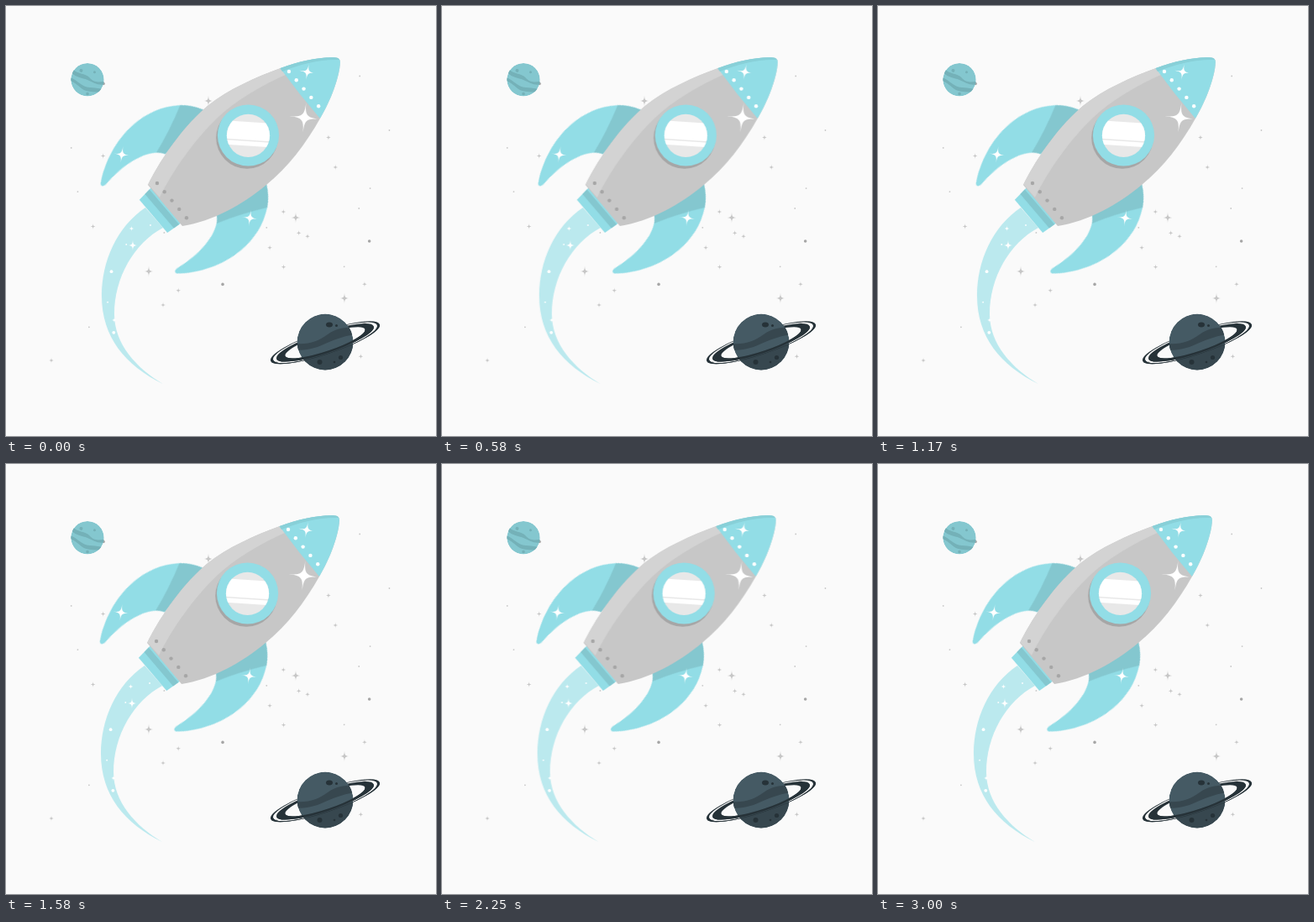
An HTML page for the animation above (3.04 s loop, 512 by 512 pixels).

```html
<!DOCTYPE html>
<html lang="en">
<head>
<meta charset="utf-8">
<title>Rocket</title>
<style>
  html, body { margin: 0; width: 100%; height: 100%; overflow: hidden; background: #fafafa; }
  svg { display: block; width: 100vw; height: 100vh; }
  .cyan { fill: #92dde6; }
  .shade { fill: #84c7cf; }
  .grey { fill: #c7c7c7; }
  .rivet { fill: #a6a6a6; }
  .white { fill: #fff; }
  .ink { fill: #263238; }
  #ring { fill: none; stroke: #263238; }
  #ship { animation: shake 3s linear infinite paused; }
  @keyframes shake {
    0%, 100% { transform: translateX(0); }
    10%, 90% { transform: translateX(-1px); }
    20%, 80% { transform: translateX(2px); }
    30%, 50%, 70% { transform: translateX(-4px); }
    40%, 60% { transform: translateX(4px); }
  }
</style>
</head>
<body>
<svg viewBox="0 0 512 512">
  <defs>
    <clipPath id="smallDisc"><circle cx="97" cy="87.8" r="19.7"/></clipPath>
    <clipPath id="bigDisc"><circle cx="380" cy="400" r="33.4"/></clipPath>
    <clipPath id="glass"><circle cx="288.5" cy="154.3" r="25.6"/></clipPath>
    <clipPath id="front"><rect x="-70" width="140" height="70"/></clipPath>
    <clipPath id="hull"><path id="hullShape" d="M169 213C187 177 213 142 240 119C265 99 297 85 327 74C350 65 377 60 393 61.5Q398 62 398 67C397 85 387 112 374 134C357 164 336 192 310 213C281 237 247 256 210 262Z"/></clipPath>
    <path id="spark" d="M0-1C.02-.15 .15-.02 1 0C.15 .02 .02 .15 0 1C-.02 .15-.15 .02-1 0C-.15-.02-.02-.15 0-1Z"/>
    <g id="ring">
      <circle r="66.800" stroke-width="3.200"/>
      <circle r="55.500" stroke-width="11"/>
    </g>
    <g id="fin">
      <path class="cyan" d="M-42 70C-10 97 48 113 91 80Q102 71 109 57L40 47C30 65-4 71-38 65.500Q-44 66-42 70Z"/>
      <path class="shade" d="M91 80Q102 71 109 57L40 47Q37 52 33 55.500Q62 65 91 80Z"/>
    </g>
  </defs>

  <g id="sky" class="grey"></g>

  <g clip-path="url(#smallDisc)">
    <circle class="shade" cx="97" cy="87.8" r="19.7"/>
    <g fill="#74b1b8" transform="rotate(14 97 88)">
      <path d="M76 79C84 85 92 80 99 85S111 87 119 84V88C110 92 104 89 97 88S84 89 76 84Z"/>
      <path d="M76 90C86 91 92 98 102 96S112 95 119 94V97C110 100 104 101 98 101S85 94 76 94Z"/>
      <circle cx="87" cy="79" r="2"/>
      <circle cx="103" cy="77" r="1.5"/>
      <circle cx="101" cy="104" r="1.8"/>
    </g>
  </g>

  <use href="#ring" transform="translate(380 400.8) rotate(-18.5) scale(1 .205)"/>
  <g clip-path="url(#bigDisc)">
    <circle cx="380" cy="400" r="33.4" fill="#455a64"/>
    <g fill="#37474f">
      <path d="M345 402C362 403 372 399 383 391S401 383 416 382V391C402 393 389 398 378 403S357 410 345 410Z"/>
      <path d="M345 417C365 420 382 413 393 409S408 403 416 402V434H345Z"/>
    </g>
    <g class="ink">
      <ellipse cx="385" cy="379.5" rx="4" ry="3"/>
      <circle cx="393.5" cy="380.5" r="1.5"/>
      <circle cx="373.500" cy="424" r="3"/>
      <circle cx="398.500" cy="418.500" r="2.6"/>
      <circle cx="391" cy="424" r="1.3"/>
    </g>
  </g>
  <g transform="translate(380 400.8) rotate(-18.5) scale(1 .205)">
    <use href="#ring" clip-path="url(#front)"/>
  </g>

  <g id="ship">
    <path fill="#bbe9ee" d="M166 240C132 263 114 304 114 345C114 394 142 428 187 450C155 431 129 402 129 367C129 323 153 282 187 264Z"/>
    <path id="wake" fill="none" d="M172 261C140 278 120 310 121 350C122 390 140 425 186 450"/>
    <!-- axis along the hull, origin at the tail -->
    <g transform="translate(190 238) rotate(-40.4)">
      <use href="#fin"/>
      <use href="#fin" transform="scale(1 -1)"/>
      <path class="cyan" d="M-19-25.7L2-27.7V27.7L-19 25.7Z"/>
      <path class="shade" d="M-9.5-26.6L-2-27.3V27.3L-9.5 26.6Z"/>
    </g>
    <use href="#hullShape" class="grey"/>
    <g clip-path="url(#hull)">
      <path fill="#d3d3d3" d="M165 207L183 228C199 195 226 158 251 134C273 113 303 95 335 81L320 60L220 110Z"/>
      <path class="cyan" d="M326.5 74Q349 105 374 134L410 100V50H326Z"/>
      <path fill="#88d0d8" d="M326.5 74L329 78C350 69 375 63 398 64V50H330Z"/>
    </g>
    <circle class="rivet" cx="287" cy="157" r="36.8"/>
    <circle class="cyan" cx="288.5" cy="154" r="36.6"/>
    <g clip-path="url(#glass)">
      <path fill="#e8e8e8" d="M260 125H318V184H260Z"/>
      <path class="white" d="M260 136L318 140V161.5L260 157.5ZM260 159L318 163V168.5L260 164.5Z"/>
    </g>
    <g id="marks" class="white">
      <use href="#spark" transform="translate(355.5 133) rotate(6) scale(18)"/>
      <use href="#spark" transform="translate(359 78.5) rotate(10) scale(10)"/>
      <use href="#spark" transform="translate(138 177) rotate(8) scale(10)"/>
      <use href="#spark" transform="translate(290.5 252.5) rotate(8) scale(10)"/>
      <use href="#spark" transform="translate(151 285) scale(7)"/>
      <use href="#spark" transform="translate(149.5 265) scale(4)"/>
      <use href="#spark" transform="translate(129 374) scale(4)"/>
    </g>
  </g>
</svg>
<script>
  const byId = id => document.getElementById(id);
  const [sky, marks, ship, wake] = ["sky", "marks", "ship", "wake"].map(byId);

  function add(parent, tag, attrs) {
    const el = document.createElementNS("http://www.w3.org/2000/svg", tag);
    for (const key in attrs) el.setAttribute(key, attrs[key]);
    parent.append(el);
  }
  const dot = (parent, cx, cy, r, cls = "") =>
    add(parent, "circle", { cx, cy, r, class: cls });
  const star = (x, y, size) =>
    add(sky, "use", { href: "#spark", transform: `translate(${x} ${y}) scale(${size})` });

  let seed = 7;
  function random() {
    seed = (seed * 16807) % 2147483647;
    return seed / 2147483647;
  }
  const between = (low, high) => low + random() * (high - low);
  const skyPoint = () => [between(54, 458), between(62, 453)];

  // Four bright stars, then a random scatter of small stars and specks.
  [[241, 113], [345, 252], [170, 316], [403, 348]].forEach(([x, y]) => star(x, y, 7));
  for (let i = 0; i < 19; i++) star(...skyPoint(), 4);
  for (let i = 0; i < 28; i++) {
    const large = i % 4 === 0;
    dot(sky, ...skyPoint(), large ? 1.8 : 0.9, large ? "rivet" : "");
  }

  // Rows of studs on the nose and tail, and specks along the wake.
  for (let i = 0; i < 5; i++) {
    dot(marks, 337 + i * 8.8, 78 + i * 10.3, 2.2);
    dot(marks, 180 + i * 8.75, 211 + i * 10.3, 2.2, "rivet");
    const p = wake.getPointAtLength(i * 37);
    dot(marks, p.x, p.y, i > 1 && i % 2 === 0 ? 1.9 : 0.9);
  }

  // Motion advances in 24 steps per second, with one extra step before the loop restarts.
  const LOOP = 3040, STEP = 1000 / 24, LEAD = 30;
  const start = performance.now();
  function tick() {
    const t = (performance.now() - start) % LOOP;
    const step = Math.min(72, Math.floor((t + 5) / STEP));
    ship.style.animationDelay = `${-(step * STEP + LEAD)}ms`;
    requestAnimationFrame(tick);
  }
  tick();
</script>
</body>
</html>
```
